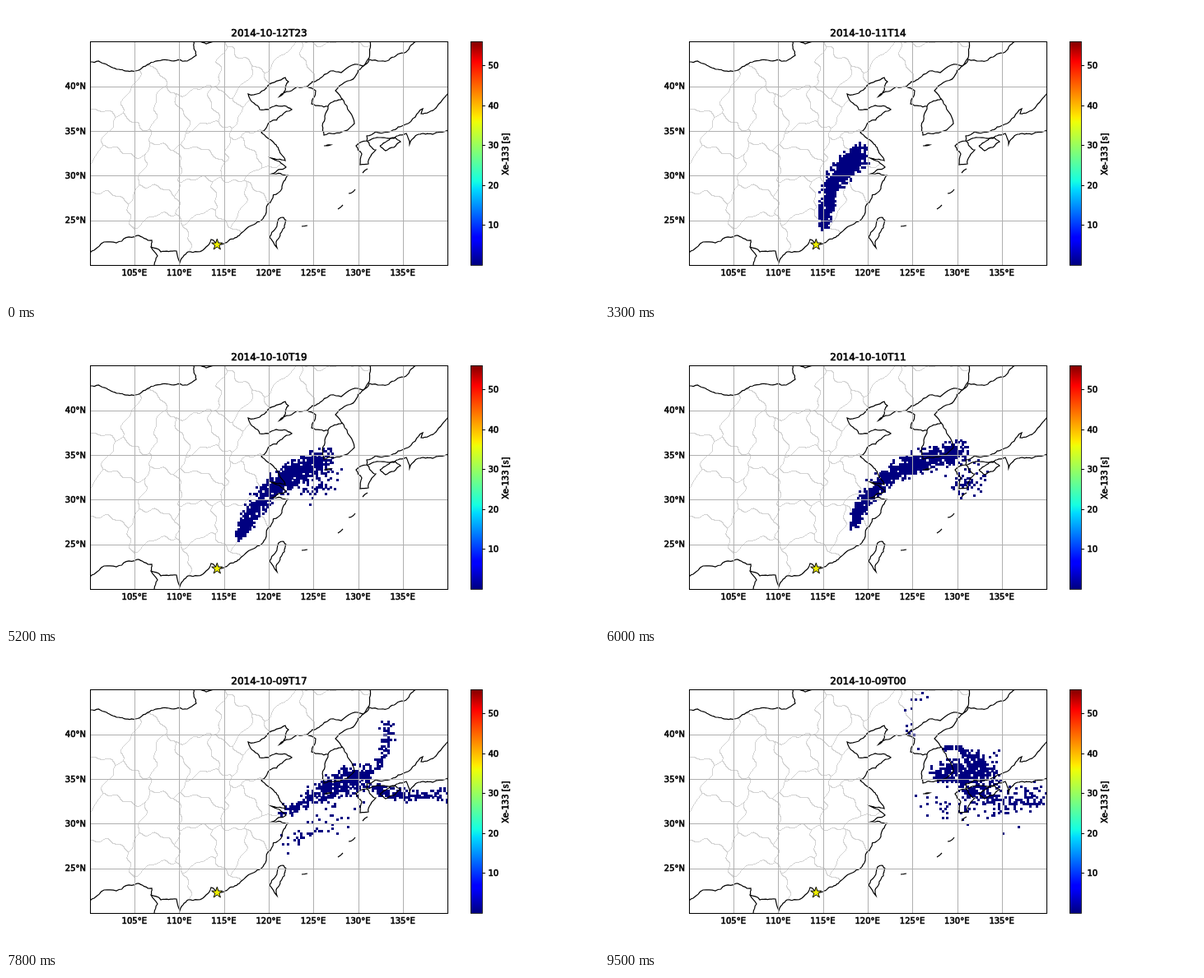
An HTML page with a canvas for the animation above (9.6 s loop, 720 px wide and 360 px high).

```html
<!DOCTYPE html>
<html lang="en">
<head>
<meta charset="utf-8">
<title>Xe-133 plume</title>
<style>
  html, body { margin: 0; width: 100%; height: 100%; overflow: hidden; background: #fff; }
  canvas { display: block; }
</style>
</head>
<body>
<canvas width="720" height="360"></canvas>
<script>
const ctx = document.querySelector('canvas').getContext('2d');
const STEP = 100, STEPS = 96;
const LEFT = 102, TOP = 43, WIDTH = 434, HEIGHT = 272, DEG = 10.86, CELL = DEG / 4;
const lonX = lon => LEFT - .2 + (lon - 100) * DEG;
const latY = lat => TOP + .4 + (45 - lat) * DEG;
const lerp = (a, b, k) => a + (b - a) * k;

let seed = 7;
const rnd = () => (seed = seed * 16807 % 2147483647) / 2147483647;

// Splits a segment at displaced midpoints until it looks like a shoreline
function ragged([x0, y0], [x1, y1]) {
  if (Math.hypot(x1 - x0, y1 - y0) < 4) return [[x1, y1]];
  const k = (rnd() - .5) * .26;
  const mid = [(x0 + x1) / 2 - (y1 - y0) * k, (y0 + y1) / 2 + (x1 - x0) * k];
  return [...ragged([x0, y0], mid), ...ragged(mid, [x1, y1])];
}
const pairs = str => str.match(/\d+ \d+/g).map(p => p.split(' ').map(Number));
function shore(str) {
  const pts = pairs(str);
  return pts.flatMap((p, i) => i ? ragged(pts[i - 1], p) : [p]);
}

// Key points of coasts and borders, "x y x y ..."
const steppe = shore('102 68 122 71 157 79 198 66 220 67 231 60 228 43');
const river = shore('442 43 441 63 434 73 420 72 407 81 394 79 365 98');
const gulf = shore('365 98 344 104 332 110 343 92 339 87 318 97 308 106 294 107 301 118 308 126 328 121 347 126 335 133 310 154 325 166 334 180 339 188 322 185 340 196 323 204 343 206');
const south = shore('343 206 335 222 318 241 315 254 298 267 286 276 258 290 249 284 243 293 221 299 211 312 207 298 188 299 176 293 177 285 159 279 134 288 119 287 107 297 102 300');
const peninsula = shore('365 98 376 103 371 119 391 122 387 134 386 157 411 152 423 143 410 115 400 103 424 86 434 73 441 65 455 67 490 50 499 43');
const islands = [
  '235 43 243 46 256 43', '391 122 409 113', '176 293 184 304 180 315',
  '438 164 425 170 432 180 430 193 440 192 449 175 438 164',
  '454 170 472 160 479 165 461 176 454 170',
  '438 164 438 158 449 153 485 144 497 135 506 125 504 131 522 124 537 106',
  '438 164 455 160 486 155 490 168 501 156 518 156 537 151',
  '337 257 340 261 329 294 320 281 331 259 337 257',
  '386 170 394 169 386 170', '403 247 409 242', '416 228 424 223', '359 268 366 267', '433 203 439 198'
].map(shore);

function addLine(path, pts) {
  pts.forEach(([x, y], i) => i ? path.lineTo(x, y) : path.moveTo(x, y));
  return path;
}
const coast = [steppe, river, gulf, south, peninsula, ...islands].reduce(addLine, new Path2D());
const land = addLine(new Path2D(), [...steppe, ...river, ...gulf, ...south]);

// Provinces: each point belongs to the nearest centre, with wavy borders
const centres = pairs('340 78 390 58 390 30 230 80 320 50 268 117 279 95 290 103 300 138 235 125 196 138 165 128 122 112 148 155 105 142 248 165 310 172 286 186 235 192 190 205 140 200 322 215 275 235 230 230 300 245 180 240 122 265 190 275 250 276');
function home(x, y) {
  const wx = x + 4 * Math.sin(y / 8) + 2 * Math.sin(y / 3 + x / 11);
  const wy = y + 4 * Math.sin(x / 9) + 2 * Math.sin(x / 3 + y / 13);
  let best = 0, least = Infinity;
  centres.forEach(([cx, cy], i) => {
    const d = (wx - cx) ** 2 + (wy - cy) ** 2;
    if (d < least) [best, least] = [i, d];
  });
  return best;
}
const provinces = new Path2D();
for (let x = LEFT; x < 442; x++) {
  for (let y = TOP; y < TOP + HEIGHT; y++) {
    const own = home(x, y);
    if (own !== home(x + 1, y) || own !== home(x, y + 1)) provinces.rect(x, y, 1, 1);
  }
}

const star = new Path2D();
for (let i = 0; i < 10; i++) {
  const r = i % 2 ? 2.7 : 7, a = i * Math.PI / 5;
  star.lineTo(256.3 + r * Math.sin(a), 290.3 - r * Math.cos(a));
}
star.closePath();

// Plume poses: [step, tail x, y, middle x, y, head x, y, spread]
const shared = [
  [0, 256, 289, 256, 289, 256, 289, 1],
  [15, 255, 286, 264, 255, 280, 227, 3.5],
  [33, 267, 268, 275, 222, 310, 181, 6],
  [44, 268, 262, 296, 214, 340, 169, 8],
  [60, 303, 238, 342, 180, 434, 148, 6.5]
];
const strands = [
  { count: 650, lead: 0, thins: true, poses: [
    [78, 336, 196, 390, 164, 434, 150, 8], [95, 402, 148, 430, 143, 466, 146, 11]] },
  { count: 110, lead: .6, poses: [
    [78, 436, 148, 459, 122, 462, 80, 4], [95, 408, 114, 445, 122, 469, 150, 3]] },
  { count: 210, lead: .6, poses: [
    [78, 448, 160, 470, 170, 538, 173, 4], [95, 436, 166, 480, 177, 540, 176, 9]] },
  { count: 55, lead: .6, poses: [
    [60, 385, 172, 425, 186, 452, 180, 9],
    [78, 342, 230, 385, 207, 428, 182, 10], [95, 390, 180, 455, 190, 525, 190, 14]] },
  { count: 14, lead: .8, poses: [
    [78, 455, 136, 462, 105, 462, 80, 3], [95, 381, 118, 366, 68, 394, 45, 4]] }
];
const scatter = () => (rnd() + rnd() + rnd() - 1.5) * 1.6;
const particles = strands.flatMap(({ count, lead, thins, poses }) =>
  Array.from({ length: count }, () => {
    const u = rnd();
    return {
      u, lead, dx: scatter(), dy: scatter(),
      end: thins && rnd() > u + .2 ? lerp(60, 78, rnd()) : STEPS,
      poses: [...shared.filter(p => p[0] < poses[0][0]), ...poses]
    };
  }));

// Place of a particle on the parabola through the three points of a pose
function place({ u, lead, dx, dy }, [step, x0, y0, x1, y1, x2, y2, spread]) {
  const v = step > 60 ? u : lerp(lead, 1, u);
  const a = (1 - v) * (1 - 2 * v), b = 4 * v * (1 - v), c = v * (2 * v - 1);
  const s = spread * (.6 + .8 * v);
  return [a * x0 + b * x1 + c * x2 + dx * s, a * y0 + b * y1 + c * y2 + dy * s];
}

function drawPlume(step) {
  if (!step) return;
  ctx.fillStyle = '#000080';
  for (const p of particles) {
    if (step > p.end) continue;
    const i = p.poses.findIndex(pose => pose[0] >= step);
    const from = p.poses[i - 1], to = p.poses[i];
    const k = (step - from[0]) / (to[0] - from[0]);
    const [ax, ay] = place(p, from), [bx, by] = place(p, to);
    const col = Math.floor((lerp(ax, bx, k) - LEFT) / CELL);
    const row = Math.floor((lerp(ay, by, k) - TOP) / CELL);
    ctx.fillRect(Math.round(LEFT + col * CELL), Math.round(TOP + row * CELL), 3, 3);
  }
}

function text(str, x, y, size, align) {
  ctx.font = `${size}px "DejaVu Sans", sans-serif`;
  ctx.textAlign = align;
  ctx.fillStyle = ctx.strokeStyle = '#000';
  ctx.lineWidth = .6;
  ctx.fillText(str, x, y);
  ctx.strokeText(str, x, y);
}
function line(x0, y0, x1, y1) {
  ctx.beginPath();
  ctx.moveTo(x0, y0);
  ctx.lineTo(x1, y1);
  ctx.stroke();
}
function stroke(path, width) {
  ctx.strokeStyle = '#000';
  ctx.lineWidth = width;
  ctx.stroke(path);
}
const snap = v => Math.round(v) + .5;
const lons = [105, 110, 115, 120, 125, 130, 135], lats = [25, 30, 35, 40];

function drawMap(step) {
  ctx.save();
  ctx.beginPath();
  ctx.rect(LEFT, TOP, WIDTH, HEIGHT);
  ctx.clip();
  ctx.save();
  ctx.clip(land);
  ctx.fillStyle = '#d3d3d3';
  ctx.fill(provinces);
  ctx.restore();
  drawPlume(step);
  stroke(coast, 1.2);
  ctx.strokeStyle = '#b0b0b0';
  ctx.lineWidth = 1;
  lons.forEach(lon => line(snap(lonX(lon)), TOP, snap(lonX(lon)), TOP + HEIGHT));
  lats.forEach(lat => line(LEFT, snap(latY(lat)), LEFT + WIDTH, snap(latY(lat))));
  ctx.restore();
  ctx.fillStyle = '#ee0';
  ctx.fill(star);
  stroke(star, 1);
  ctx.strokeRect(LEFT + .5, TOP + .5, WIDTH, HEIGHT);
  lons.forEach(lon => text(lon + '°E', lonX(lon) - .3, 328, 10, 'center'));
  lats.forEach(lat => text(lat + '°N', 97, latY(lat) + 3.5, 10, 'right'));
}

const jet = ctx.createLinearGradient(0, TOP + HEIGHT, 0, TOP);
[[0, '#000080'], [.11, '#00f'], [.125, '#00f'], [.34, '#00dbff'], [.375, '#15ffe2'], [.64, '#eeff08'],
 [.66, '#ffec00'], [.89, '#ff1300'], [.91, '#f00'], [1, '#800000']].forEach(s => jet.addColorStop(...s));

function drawColorbar() {
  ctx.fillStyle = jet;
  ctx.fillRect(564, TOP, 14, HEIGHT);
  ctx.strokeStyle = '#000';
  ctx.lineWidth = .8;
  ctx.strokeRect(564.5, TOP + .5, 14, HEIGHT);
  for (let v = 10; v <= 50; v += 10) {
    const y = 315 - v * 4.86;
    ctx.lineWidth = 1;
    line(578.5, snap(y), 582, snap(y));
    text(v, 585.5, y + 4, 10, 'left');
  }
  ctx.save();
  ctx.translate(610, 180);
  ctx.rotate(-Math.PI / 2);
  text('Xe-133 [s]', 0, 0, 10, 'center');
  ctx.restore();
}

function draw(step) {
  ctx.fillStyle = '#fff';
  ctx.fillRect(0, 0, 720, 360);
  drawMap(step);
  drawColorbar();
  const time = new Date(Date.UTC(2014, 9, 12, 23 - step));
  text(time.toISOString().slice(0, 13), 319.5, 37, 12, 'center');
}

let shown = -1;
function tick() {
  const step = Math.floor(performance.now() / STEP) % STEPS;
  if (step !== shown) draw(shown = step);
  requestAnimationFrame(tick);
}
tick();
</script>
</body>
</html>
```
